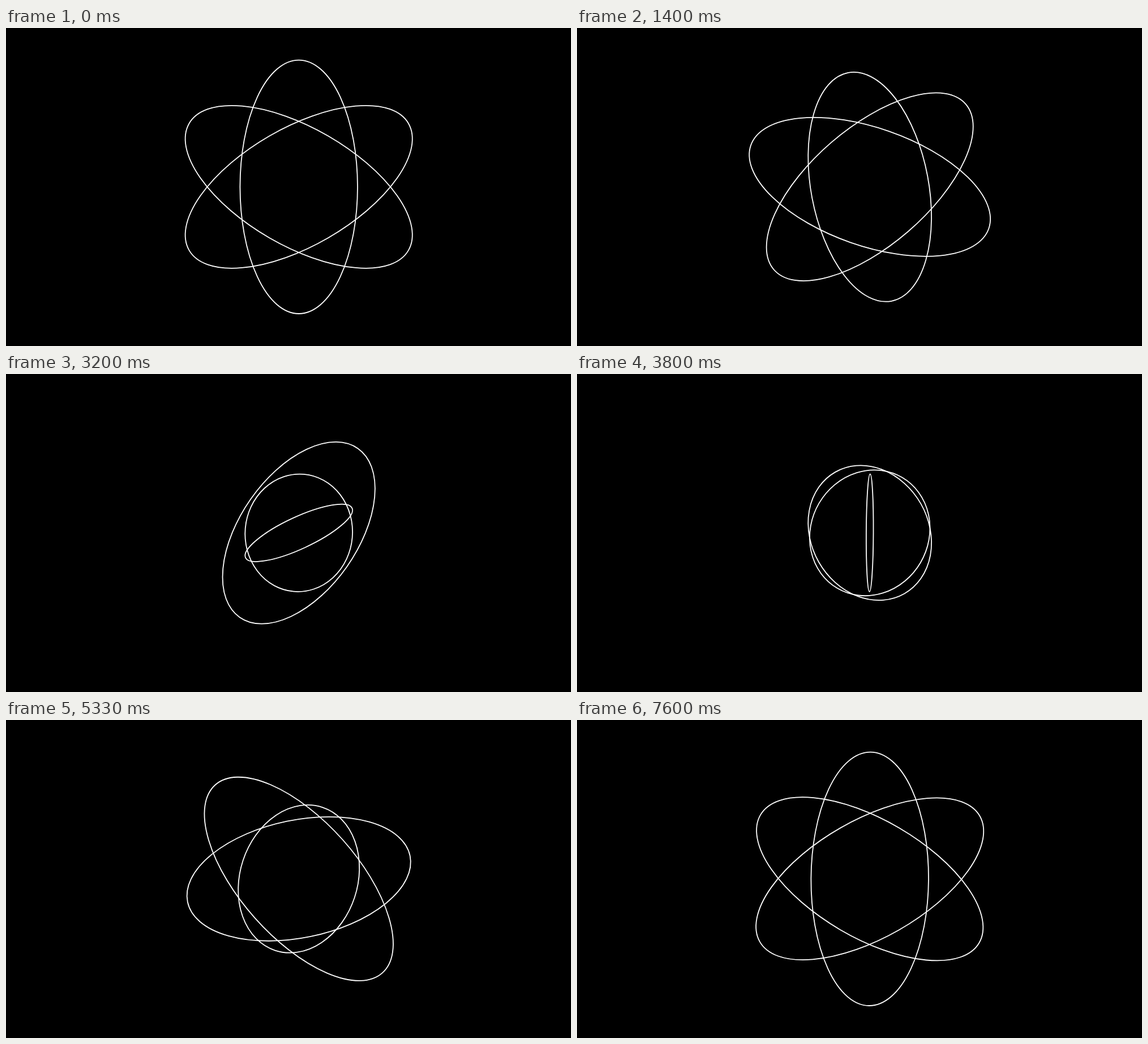
Animation of 998 by 561 pixels, one loop 7.63 s. Source, as an HTML page with a canvas:

```html
<!DOCTYPE html>
<html lang="en">
<head>
<meta charset="utf-8">
<title>Orbits</title>
<style>
  html, body { margin: 0; width: 100%; height: 100%; overflow: hidden; background: #000; }
  canvas { display: block; }
</style>
</head>
<body>
<canvas width="998" height="561"></canvas>
<script>
const ctx = document.querySelector('canvas').getContext('2d');
const LOOP = 7630, STEPS = 190, FLIP = 150;
const CX = 517.2, CY = 280.3, LONG = 223.7, SHORT = 103.8;
const rings = [
  { angle: 90, start: 0 },
  { angle: 30, start: 18.1 },
  { angle: 150, start: 36.2 }
];

const rad = deg => deg * Math.PI / 180;

function smooth(x) {
  const s = Math.min(1, Math.max(0, x));
  return s * s * (3 - 2 * s);
}

// 25 steps a second, shown on a 30 Hz clock
function stepAt(ms) {
  const tick = Math.floor((ms + 4) * 0.03);
  return Math.max(0, Math.floor(tick * 5 / 6) - 1);
}

function draw() {
  const step = stepAt(performance.now() % LOOP);
  const turn = -60 * step / STEPS;
  ctx.fillStyle = '#000';
  ctx.fillRect(0, 0, 998, 561);
  ctx.strokeStyle = '#fff';
  ctx.lineWidth = 1.8;
  for (const { angle, start } of rings) {
    // each ring flips over its short axis while all turn together
    const flip = Math.PI * smooth((step - start) / FLIP);
    ctx.beginPath();
    ctx.ellipse(CX, CY, Math.abs(LONG * Math.cos(flip)), SHORT, rad(angle + turn), 0, 2 * Math.PI);
    ctx.stroke();
  }
  requestAnimationFrame(draw);
}
draw();
</script>
</body>
</html>
```
